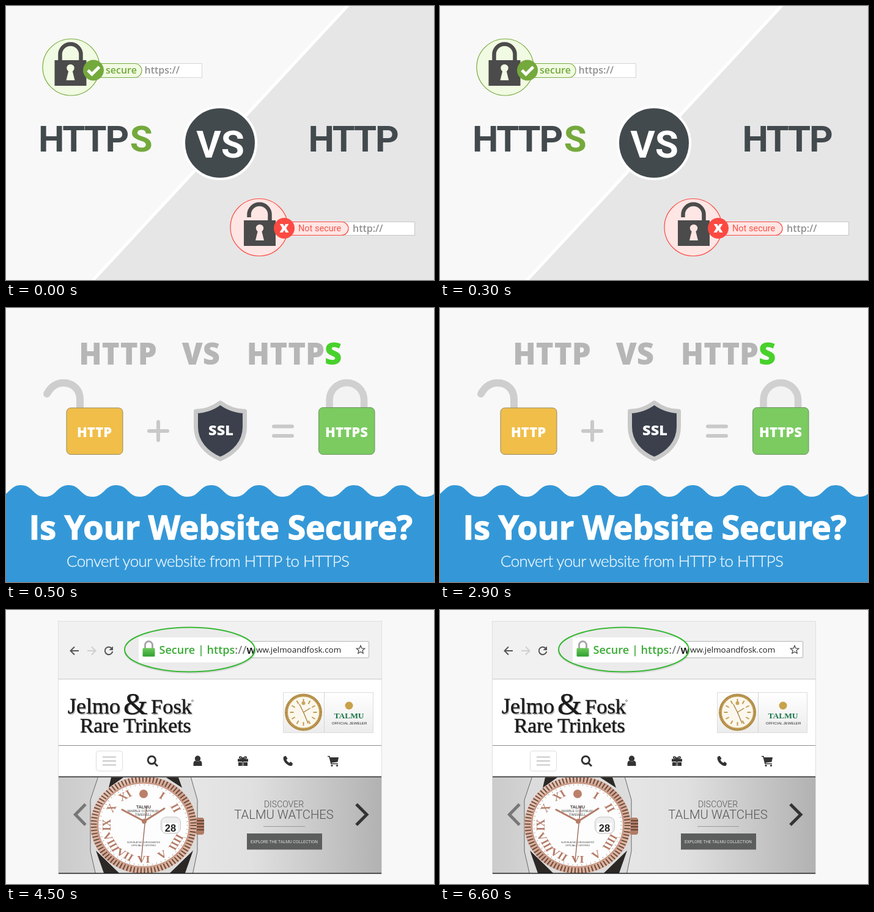
An HTML page that plays this animation: 700x450 px, repeating every 8 s.

```html
<!DOCTYPE html>
<html lang="en">
<head>
<meta charset="utf-8">
<title>HTTPS vs HTTP</title>
<style>
html, body { margin: 0; width: 100%; height: 100%; overflow: hidden; background: #f8f8f8; }
svg { display: block; width: 100vw; height: 100vh; }
.os { font-family: "Open Sans", sans-serif; font-weight: 600; }
.xb { font-family: "Open Sans", sans-serif; font-weight: 800; }
.rb { font-family: Roboto, sans-serif; }
.lt { font-family: Lato, sans-serif; font-weight: 300; }
.sf { font-family: "Liberation Serif", serif; }
.ss { font-family: "Liberation Sans", sans-serif; }
.mid { text-anchor: middle; }
.line { fill: none; }
.round { fill: none; stroke-linecap: round; stroke-linejoin: round; }
</style>
</head>
<body>
<svg viewBox="0 0 700 450" xmlns="http://www.w3.org/2000/svg">
<defs>
  <linearGradient id="steel" x1="0" x2="1">
    <stop offset="0" stop-color="#cbcbcb"/><stop offset=".4" stop-color="#e6e6e6"/>
    <stop offset=".6" stop-color="#e0e0e0"/><stop offset="1" stop-color="#b2b2b2"/>
  </linearGradient>
  <linearGradient id="badge" x1="0" x2="0" y1="0" y2="1">
    <stop offset="0" stop-color="#fff"/><stop offset="1" stop-color="#ececec"/>
  </linearGradient>
  <linearGradient id="leaf" x1="0" x2="0" y1="0" y2="1">
    <stop offset="0" stop-color="#6cc95c"/><stop offset="1" stop-color="#2f9f2f"/>
  </linearGradient>
  <linearGradient id="rose" x1="0" y1="0" x2="1" y2="1">
    <stop offset="0" stop-color="#f0d0c0"/><stop offset=".5" stop-color="#d3a48f"/><stop offset="1" stop-color="#e8bfa9"/>
  </linearGradient>
  <clipPath id="lens"><ellipse cx="300.5" cy="65" rx="107" ry="37"/></clipPath>
  <clipPath id="banner"><rect x="86" y="275" width="528" height="157"/></clipPath>
  <g id="padlock">
    <rect x="-26" y="-11" width="52" height="42" fill="#4b4b4b"/>
    <circle r="6.2" cy="2"/><path d="M-2.6 4H2.6L7 22H-7Z"/>
  </g>
</defs>

<g class="scene">
  <rect width="700" height="450" fill="#f8f8f8"/>
  <path d="M558.5 0H700V450H142.5Z" fill="#e6e6e6"/>
  <path d="M563 -5L138 455" stroke="#fff" stroke-width="5"/>

  <rect x="200.5" y="94.5" width="120" height="23" fill="#fff" stroke="#d6d6d6"/>
  <circle cx="106.5" cy="100.5" r="46.5" fill="#f1fae2" stroke="#77ab3f" stroke-width="1.2"/>
  <rect x="135" y="94.5" width="87" height="23" rx="11.5" fill="#f1fae2" stroke="#77ab3f" stroke-width="1.2"/>
  <path class="line" d="M88.5 90V79.5a17 17 0 0 1 34 0V90" stroke="#4b4b4b" stroke-width="6.5"/>
  <use href="#padlock" x="105.5" y="100" fill="#f1fae2"/>
  <circle cx="143" cy="105.5" r="17" fill="#74a93c"/>
  <path class="line" d="M134 105.5L140.5 112L152.5 100" stroke="#fff" stroke-width="5"/>
  <text class="os" x="163" y="111" font-size="16" fill="#74a93c">secure</text>
  <text class="os" x="226.5" y="111" font-size="16" fill="#909090">https://</text>

  <rect x="540.5" y="354.5" width="128" height="22" fill="#fff" stroke="#c6c6c6"/>
  <circle cx="414" cy="363.5" r="47" fill="#fee6e4" stroke="#fc4a42" stroke-width="1.2"/>
  <rect x="447" y="354.5" width="113" height="22" rx="11" fill="#fee6e4" stroke="#fc4a42" stroke-width="1.2"/>
  <path class="line" d="M397.5 347V342.5a17 17 0 0 1 34 0V354" stroke="#4b4b4b" stroke-width="6.5"/>
  <use href="#padlock" x="415" y="363" fill="#fee6e4"/>
  <circle cx="455" cy="365" r="17" fill="#fc4a42"/>
  <text class="xb mid" x="455" y="371.5" font-size="24" fill="#fff">x</text>
  <text class="rb" x="478" y="370" font-size="14.5" fill="#f8544c">Not secure</text>
  <text class="os" x="567" y="371" font-size="16" fill="#909090">http://</text>

  <g class="rb" font-weight="700" fill="#434a4d" font-size="60" letter-spacing="-2.3">
    <text x="53" y="239">HTTP<tspan dx="4" fill="#74a93c">S</tspan></text>
    <text x="494.5" y="239">HTTP</text>
  </g>
  <circle cx="350" cy="225" r="59" fill="#434a4d" stroke="#fff" stroke-width="4"/>
  <text class="rb mid" x="350.5" y="248.5" font-size="62" font-weight="700" fill="#fff">VS</text>
</g>

<g class="scene">
  <rect width="700" height="450" fill="#f8f8f8"/>
  <g class="xb mid" font-size="49" fill="#b6b6b6">
    <text x="183" y="93">HTTP</text><text x="319" y="93">VS</text>
    <text x="471.5" y="93">HTTP<tspan fill="#48d12c">S</tspan></text>
  </g>
  <path class="round" d="M67 141C73 130 82 123 94 123C111 123 121 135 121 150V168" stroke="#cecece" stroke-width="12"/>
  <rect x="99" y="164" width="92" height="76.5" rx="7" fill="#f0be49" stroke="#978a62"/>
  <path d="M529 168V151a28.3 28.3 0 0 1 56.600 0V168" fill="#f3f3f3" stroke="#d0d0d0" stroke-width="11.5"/>
  <rect x="511.5" y="163.5" width="91.5" height="77" rx="7" fill="#7bcb61" stroke="#6b9160"/>
  <path class="round" d="M234 202H264M249 187V217M438 194.5H468M438 210H468" stroke="#c9c9c9" stroke-width="6"/>
  <path d="M350.5 155.5C339 164 325 169.500 310.5 169.500V195C310.5 220 327 238 350.5 248C374 238 390.5 220 390.5 195V169.500C376 169.500 362 164 350.5 155.5Z" fill="#3b404c" stroke="#c9c9c9" stroke-width="7" stroke-linejoin="round"/>
  <g class="xb mid" font-size="22" fill="#fff">
    <text x="144.5" y="212">HTTP</text><text x="351.500" y="208.500" font-size="23.500">SSL</text><text x="557" y="212">HTTPS</text>
  </g>
  <path id="sea" fill="#3498d8"/>
  <text class="os" x="37.500" y="379.500" font-size="54" letter-spacing="-.25" style="font-weight:700" fill="#fff" stroke="#fff" stroke-width="1.300">Is Your Website Secure?</text>
  <text class="lt" x="99" y="424.500" font-size="26" letter-spacing="-.64" fill="#f0f8ff" stroke="#f0f8ff" stroke-width=".35">Convert your website from HTTP to HTTPS</text>
</g>

<g class="scene">
  <rect width="700" height="450" fill="#f8f8f8"/>
  <rect x="85.5" y="18.5" width="529" height="414.5" fill="#fff" stroke="#dedede"/>
  <rect x="86" y="19" width="528" height="94" fill="#f1f1f1"/>
  <path d="M86 113.5H614" stroke="#c8c8c8"/>

  <g class="line" stroke="#555" stroke-width="2">
    <path d="M119 67H106M112 60.500L105.500 67L112 73.500"/>
    <path d="M133 67H146M140 60.500L146.500 67L140 73.500" stroke="#cfcfcf"/>
    <path d="M173 63A6.300 6.300 0 1 0 174.300 68"/>
  </g>
  <path d="M175 59.500V66H168.500Z" fill="#555"/>
  <rect x="300" y="51.500" width="293.500" height="27" rx="1.500" fill="#fff" stroke="#b4b4b4"/>
  <text class="os" x="409" y="70" font-size="13.400" style="font-weight:400" fill="#222">ww.jelmoandfosk.com</text>
  <path id="star" class="line" stroke="#555" stroke-width="1.400"/>
  <ellipse cx="301" cy="67" rx="108" ry="37.500" fill="#000" opacity=".1"/>
  <g clip-path="url(#lens)">
    <rect x="190" y="25" width="220" height="80" fill="#ebebeb"/>
    <rect x="217" y="45" width="200" height="41" fill="#fff"/>
    <path class="line" d="M227.500 65V57.500a6 6 0 0 1 12 0V65" stroke="#a8a8a8" stroke-width="3"/>
    <rect x="223.500" y="62.500" width="20" height="14" rx="1.500" fill="url(#leaf)"/>
    <text class="os" x="250.500" y="72" font-size="18.100" fill="#3aaa35">Secure | https<tspan fill="#808080">://</tspan><tspan fill="#111">w</tspan></text>
  </g>
  <ellipse class="line" cx="300.5" cy="65" rx="106.500" ry="36.500" stroke="#37b834" stroke-width="2"/>

  <g id="sign" class="sf" stroke-width=".5">
    <text x="101" y="170" font-size="36">Jelmo</text>
    <text x="192" y="170.500" font-size="51">&amp;</text>
    <text x="237" y="170" font-size="34.500">Fosk</text>
    <text x="121" y="200.500" font-size="33.500">Rare Trinkets</text>
  </g>
  <circle class="line" cx="305" cy="149" r="1.500" stroke="#555" stroke-width=".7"/>

  <rect x="453.500" y="135.500" width="147" height="66" fill="url(#badge)" stroke="#dcdcdc"/>
  <path d="M520.500 136V201" stroke="#d4d4d4"/>
  <circle cx="486.500" cy="168" r="28" fill="#fbf7ec" stroke="#c9a45c" stroke-width="5"/>
  <circle class="line" cx="486.500" cy="168" r="28.500" stroke="#8d6d34" stroke-width="3.500" stroke-dasharray=".9 1.700"/>
  <g id="hours" stroke="#c29b55" stroke-width="2"></g>
  <circle cx="486.500" cy="153" r="3" fill="#c9a45c"/>
  <path class="round" d="M480 155L486.500 168L497 161.500M486.500 168L494 186" stroke="#a98546" stroke-width="1.400"/>
  <circle cx="561" cy="157" r="6.500" fill="#c8a24a"/>
  <text class="sf mid" x="561" y="177.500" font-size="13.500" font-weight="700" fill="#1b7549">TALMU</text>
  <text class="ss mid" x="561.500" y="188" font-size="6.100" fill="#222">OFFICIAL JEWELER</text>

  <path d="M86 222.500H614" stroke="#8c8c8c"/>
  <rect x="147.500" y="231.500" width="43" height="33" rx="4" fill="#fff" stroke="#dcdcdc"/>
  <path d="M158 241.500H180M158 248H180M158 254.500H180" stroke="#c8c8c8" stroke-width="2"/>
  <g fill="#333">
    <path class="line" d="M243 251.500L248 256.500M244.500 246.500a6.200 6.200 0 1 0-12.400 0a6.200 6.200 0 1 0 12.400 0" stroke="#333" stroke-width="3"/>
    <circle cx="313.500" cy="244" r="4.700"/>
    <path d="M306.500 256V253Q306.500 247.500 310 247.500Q313.500 250 317 247.500Q320.500 247.500 320.500 253V256Z"/>
    <path d="M379 244.500H396V249H379ZM380 250H386V256H380ZM389 250H395V256H389Z"/>
    <path class="line" d="M387.500 244C378 245 382 237 387.500 244C393 237 397 245 387.500 244V256" stroke="#333" stroke-width="1.800"/>
    <path d="M454 241L457.500 239.500L460.500 244L458.500 246Q460 249.500 463.500 251L465.500 249L469 252L468 255.500Q465 257 461 254.500Q454.500 250.500 453.500 244Z"/>
    <path d="M530 242H544L542.500 249.500L531.500 251Z"/>
    <path class="line" d="M526 240.500H529L532 252.500H543" stroke="#333" stroke-width="1.700"/>
    <circle cx="533" cy="255.500" r="1.600"/><circle cx="541.500" cy="255.500" r="1.600"/>
  </g>

  <g clip-path="url(#banner)">
    <rect x="86" y="275" width="528" height="157" fill="url(#steel)"/>
    <path d="M152 270H301L313 312V396L304 440H148L138 396V312Z" fill="#dcdcdc" stroke="#666"/>
    <path d="M172 275H192L168 292ZM262 275H282L288 292ZM147 395L185 432H160ZM306 395L268 432H293Z" fill="#2c2826"/>
    <rect x="310" y="341" width="14" height="28" rx="4" fill="#b07c66"/>
    <path d="M312 346H324M312 351H324M312 356H324M312 361H324" stroke="#4b332a" stroke-width="1.500"/>
    <g transform="translate(225 353) scale(1 .92)">
      <circle r="87" fill="url(#rose)"/>
      <circle class="line" r="81.500" stroke="#54382e" stroke-width="10" stroke-dasharray="2.200 3.490" opacity=".8"/>
      <circle r="75" fill="#fdfdfd" stroke="#c99a86" stroke-width="2.500"/>
      <circle class="line" r="71.500" stroke="#888" stroke-width="2" stroke-dasharray=".8 6.690"/>
      <g id="numerals" class="sf mid" font-size="19" font-weight="700" fill="#b47c68"></g>
    </g>
    <circle cx="225" cy="302" r="7" fill="#b9806a"/>
    <g class="ss mid" fill="#444">
      <text x="225" y="326" font-size="7" font-weight="700">TALMU</text>
      <text x="225" y="331.500" font-size="5.200">MARBLE CONTINUAL</text>
      <text x="225" y="337.500" font-size="5.500">TIMEWELL</text>
      <text x="225" y="383" font-size="3.600">SUPERLATIVE CHRONOMETER</text>
      <text x="225" y="387.500" font-size="3.600">OFFICIALLY CERTIFIED</text>
    </g>
    <rect x="253.500" y="340" width="32" height="27" rx="9" fill="#eee" stroke="#c4c4c4"/>
    <rect x="257" y="350" width="24" height="15" fill="#fff"/>
    <text class="ss mid" x="269" y="364" font-size="16.500" font-weight="700" fill="#222">28</text>
    <path class="round" d="M226 347L190 328M226 347L259 326" stroke="#b47c68" stroke-width="3"/>
    <path class="round" d="M230 322L221 412" stroke="#94604f" stroke-width="1.300"/>
    <circle cx="226" cy="347" r="4" fill="#b47c68"/>

    <path class="line" d="M130 319L113.500 336L130 353" stroke="#777" stroke-width="5"/>
    <path class="line" d="M573 319L590 336L573 353" stroke="#333" stroke-width="5"/>
    <g class="rb mid" font-weight="300" fill="#555">
      <text x="454.500" y="324" font-size="14">DISCOVER</text>
      <text x="454.500" y="343" font-size="20.300">TALMU WATCHES</text>
    </g>
    <path d="M421 355.500H489" stroke="#999"/>
    <rect x="394" y="367" width="123" height="26.500" fill="#5c5e5d"/>
    <text class="rb mid" x="455" y="383" font-size="6.900" fill="#ddd">EXPLORE THE TALMU COLLECTION</text>
  </g>
  <path d="M86 274H614M86 432.500H614" stroke="#222" stroke-width="1.300"/>
</g>
</svg>
<script>
const $ = id => document.getElementById(id);
const polar = (cx, cy, r, turn) => {
  const a = turn * 2 * Math.PI;
  return [cx + r * Math.sin(a), cy - r * Math.cos(a)].map(v => +v.toFixed(2));
};

// A cosine with slightly fuller crests and troughs.
function drawSea() {
  const pts = [];
  for (let x = 0; x <= 700; x += 4) {
    const c = Math.cos((x - 24.5) / 77.8 * 2 * Math.PI);
    pts.push(x + ' ' + (300.5 - 9.5 * Math.sin(1.2 * c) / Math.sin(1.2)).toFixed(2));
  }
  $('sea').setAttribute('d', 'M' + pts.join('L') + 'V450H0Z');
}

function drawStar() {
  const pts = Array.from({ length: 10 }, (_, i) => polar(580, 65.5, i % 2 ? 3.2 : 7, i / 10).join(' '));
  $('star').setAttribute('d', 'M' + pts.join('L') + 'Z');
}

function drawDials() {
  const labels = ['', 'I', 'II', '', 'IIII', 'V', 'VI', 'VII', 'VIII', 'IX', 'X', 'XI'];
  labels.forEach((label, i) => {
    const [x1, y1] = polar(486.5, 168, 16, i / 12), [x2, y2] = polar(486.5, 168, 22, i / 12);
    $('hours').innerHTML += `<path d="M${x1} ${y1}L${x2} ${y2}"/>`;
    const [x, y] = polar(0, 0, 61, i / 12);
    const spin = i * 30 + (i > 3 && i < 9 ? 180 : 0);
    if (label) $('numerals').innerHTML += `<text transform="translate(${x} ${y}) rotate(${spin})" y="6.5">${label}</text>`;
  });
}

// The shop sign has a soft offset shadow under its dark letters.
function drawSign() {
  const sign = $('sign'), shade = sign.cloneNode(true);
  shade.removeAttribute('id');
  shade.setAttribute('transform', 'translate(1.5 1.5)');
  shade.setAttribute('fill', '#b4b4b4');
  sign.setAttribute('fill', '#1c1c1c');
  sign.setAttribute('stroke', '#1c1c1c');
  sign.before(shade);
}

drawSea();
drawStar();
drawDials();
drawSign();

const scenes = [...document.querySelectorAll('.scene')];
const start = performance.now();

function render(t) {
  const now = t < 500 ? 0 : t < 4500 ? 1 : 2;
  scenes.forEach((s, i) => { s.style.display = i === now ? '' : 'none'; });
}

function tick() {
  render((performance.now() - start) % 8000);
  requestAnimationFrame(tick);
}
tick();
</script>
</body>
</html>
```
